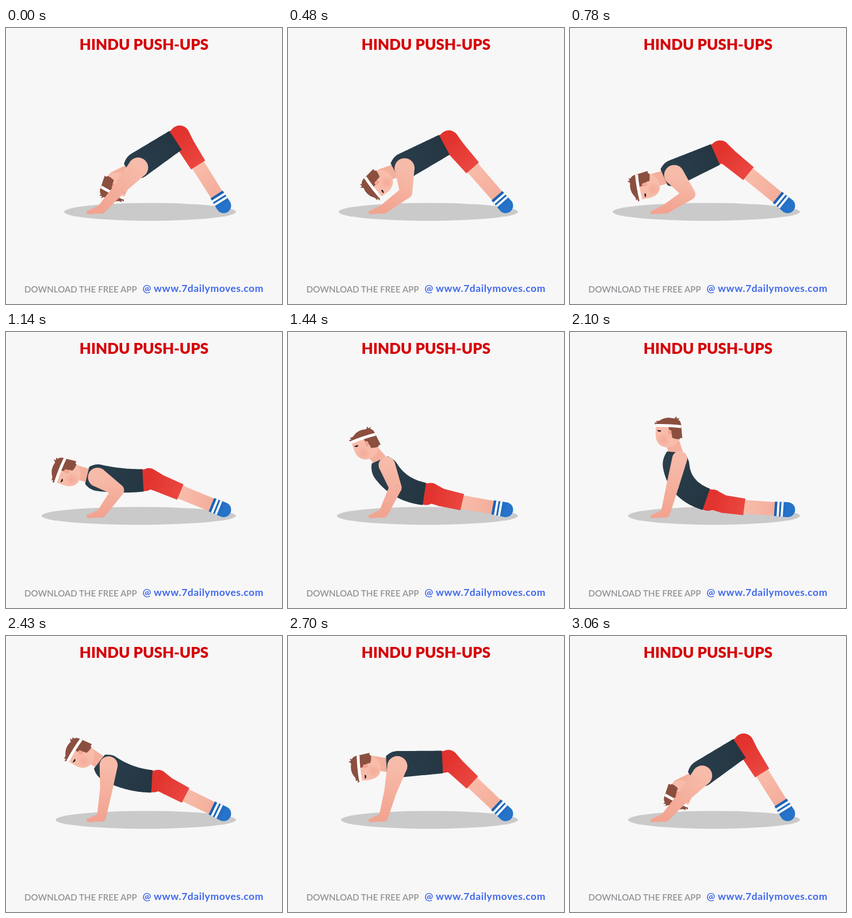
Recreate the animation shown at these times as an HTML page with a canvas. Size 480 by 480 pixels, loop 3120 ms.

```html
<!DOCTYPE html>
<html lang="en">
<head>
<meta charset="utf-8">
<title>Hindu push-ups</title>
<style>
  html, body { margin: 0; width: 100%; height: 100%; overflow: hidden; background: #f7f7f7; }
  canvas, svg { position: absolute; left: 0; top: 0; width: 480px; height: 480px; }
  text { font-family: Lato, "Open Sans", sans-serif; }
  .title { font-size: 26px; font-weight: 900; fill: #d60004; text-anchor: middle; }
  .note { font-size: 15.1px; font-weight: 600; fill: #929197; }
  .link { font-size: 17.6px; font-weight: 700; letter-spacing: .5px; fill: #4169ee; }
</style>
</head>
<body>
<canvas id="stage" width="480" height="480"></canvas>
<svg viewBox="0 0 480 480">
  <text class="title" x="240" y="37.5">HINDU PUSH-UPS</text>
  <text class="note" x="32" y="460">DOWNLOAD THE FREE APP</text>
  <text class="link" x="237.5" y="459">@</text>
  <text class="link" x="257" y="459">www.7dailymoves.com</text>
</svg>
<script>
const LOOP = 3120;
const ctx = document.getElementById('stage').getContext('2d');

const SPINE = 100, NECK = 35.5, UPPER_ARM = 42, FOREARM = 49;
const FOOT = [378.5, 309], WRIST = [166, 315], FINGERS = [143, 320.8];
const HAIR = '#8b4f40';

// waist x, y, spine angle, back bend, head angle, left end of the shadow
const PIKE = [297, 194, -33.5, 0, -156, 101];
const LOWER = [274, 202, -28, 0, -130, 88];
const DIVE = [255, 219, -24, 0, -102, 74];
const SKIM = [241, 254, 1, 6, -76, 61];
const RISE = [240, 282, 36.5, 28, -21, 85];
const COBRA = [240, 292, 56, 40, 0, 101];
const BACK = [258, 249, 17, 14, -66, 86];
const PLANK = [271, 219, -3, 0, -98, 92];

const KEYS = [
  [0, PIKE], [480, LOWER], [780, DIVE], [1100, SKIM], [1440, RISE], [1900, COBRA],
  [2100, COBRA], [2460, BACK], [2700, PLANK], [3060, PIKE], [LOOP, PIKE]
];

const rad = deg => deg * Math.PI / 180;
const polar = (deg, r) => [Math.cos(rad(deg)) * r, Math.sin(rad(deg)) * r];
const add = (a, b, k = 1) => [a[0] + b[0] * k, a[1] + b[1] * k];
const mix = (a, b, t) => [a[0] + (b[0] - a[0]) * t, a[1] + (b[1] - a[1]) * t];
const unit = (a, b) => {
  const d = Math.hypot(b[0] - a[0], b[1] - a[1]) || 1;
  return [(b[0] - a[0]) / d, (b[1] - a[1]) / d];
};
const side = v => [-v[1], v[0]];

function slope(k, i) {
  if (k === 0 || k === KEYS.length - 1) return 0;
  const rate = n => (KEYS[n + 1][1][i] - KEYS[n][1][i]) / (KEYS[n + 1][0] - KEYS[n][0]);
  const a = rate(k - 1), b = rate(k);
  return a * b <= 0 ? 0 : 2 * a * b / (a + b);
}

// Smooth interpolation without overshoot.
function poseAt(t) {
  let k = 0;
  while (k < KEYS.length - 2 && t >= KEYS[k + 1][0]) k++;
  const [t0, from] = KEYS[k], [t1, to] = KEYS[k + 1];
  const d = t1 - t0, u = (t - t0) / d, v = 1 - u;
  return from.map((a, i) =>
    a * v * v * (1 + 2 * u) + to[i] * u * u * (3 - 2 * u) +
    d * u * v * (v * slope(k, i) - u * slope(k + 1, i)));
}

function ramp(a, b, c0, c1) {
  const g = ctx.createLinearGradient(...a, ...b);
  g.addColorStop(0, c0);
  g.addColorStop(1, c1);
  return g;
}

function poly(points, fill) {
  ctx.beginPath();
  points.forEach(p => ctx.lineTo(...p));
  ctx.fillStyle = fill;
  ctx.fill();
}

function oval(x, y, rx, ry, fill) {
  ctx.beginPath();
  ctx.ellipse(x, y, rx, ry, 0, 0, 7);
  ctx.fillStyle = fill;
  ctx.fill();
}

// Tapered tube through joints [point, radius].
function limb(joints, fill, flatEnd) {
  const last = joints.length - 1;
  ctx.beginPath();
  joints.forEach(([p, r], i) => {
    if (!flatEnd || i < last) {
      ctx.moveTo(p[0] + r, p[1]);
      ctx.arc(...p, r, 0, 7);
      ctx.closePath();
    }
    if (i === last) return;
    const [q, s] = joints[i + 1];
    const n = side(unit(p, q));
    ctx.moveTo(...add(p, n, -r));
    ctx.lineTo(...add(q, n, -s));
    ctx.lineTo(...add(q, n, s));
    ctx.lineTo(...add(p, n, r));
    ctx.closePath();
  });
  ctx.fillStyle = fill;
  ctx.fill();
}

function drawLeg(waist, tangent, bend) {
  const hip = add(add(waist, tangent, 8), side(tangent), -3);
  const sag = [0, bend * 0.13];
  const thigh = add(mix(hip, FOOT, 0.14), sag);
  const hem = add(mix(hip, FOOT, 0.42), sag);
  const up = unit(FOOT, hem);
  const along = d => add(FOOT, up, d);
  limb([[hem, 12], [FOOT, 11.5]], ramp(hem, FOOT, '#f8bca9', '#f2a896'));
  limb([[FOOT, 13], [along(23), 12.5]], ramp(FOOT, along(23), '#2673ca', '#1a61b2'), true);
  ctx.strokeStyle = '#fff';
  ctx.lineWidth = 25.4;
  for (const d of [18.5, 11.5]) {
    ctx.beginPath();
    ctx.moveTo(...along(d));
    ctx.lineTo(...along(d - 3.8));
    ctx.stroke();
  }
  limb([[waist, 19], [hip, 17.5], [thigh, 15.5], [hem, 14.5]], ramp(hip, hem, '#e2332e', '#ea4740'), true);
}

function drawTorso(chest, ctrl, waist) {
  const front = [], back = [];
  for (let t = 0; t <= 1; t += 0.025) {
    const a = mix(chest, ctrl, t), b = mix(ctrl, waist, t);
    const edge = Math.max(0, 1 - t / 0.2);
    const width = (24 - 4.5 * t) * (1 - 0.36 * edge * edge);
    const p = mix(a, b, t), n = side(unit(a, b));
    front.push(add(p, n, width));
    back.unshift(add(p, n, -width));
  }
  poly([...front, ...back], ramp(chest, waist, '#2a3e4c', '#243642'));
}

function drawHead(head, angle, chest) {
  const turned = polar(angle + 70, 14);
  limb([[add(head, turned), 12], [chest, 12]], '#f4b09d');
  ctx.save();
  ctx.translate(...head);
  ctx.rotate(rad(angle));

  ctx.fillStyle = '#f8bcaa';
  ctx.fill(new Path2D('M-23-16L-23.5 4C-23 18-14 25-4 25C10 25 20 15 20 2V-16Z'));
  const blush = ctx.createRadialGradient(-10, 12, 1, -10, 12, 12);
  blush.addColorStop(0, 'rgba(238,138,122,.35)');
  blush.addColorStop(1, 'rgba(238,138,122,0)');
  oval(-10, 12, 12, 12, blush);

  ctx.fillStyle = HAIR;
  ctx.fill(new Path2D('M-1-12H21L23 9L19 9L18 11Q10 11 5 8Q6 0 0-3Z'));
  ctx.fill(new Path2D('M-23-14L-26-18L-21-18L-23-21Q-17-20-14-23Q-4-29 9-25L13-29L13-25L18-26L16-23Q21-20 21-12Z'));
  ctx.fillStyle = '#fff';
  ctx.fill(new Path2D('M-23-15.5Q0-16 21-13.5V-8.5Q0-11-23.5-10.5Z'));
  oval(1, -1, 3.2, 4.6, '#f2a693');
  ctx.fillStyle = '#241b1b';
  ctx.fill(new Path2D('M-21-5L-14-4.5V-3L-16-2L-19-2.5Z'));
  ctx.restore();
}

// The elbow follows from the two fixed bone lengths.
function drawArm(shoulder, bend) {
  const dir = unit(shoulder, WRIST);
  const d = Math.hypot(WRIST[0] - shoulder[0], WRIST[1] - shoulder[1]);
  const reach = d > UPPER_ARM + FOREARM ? d / 2 : (d * d + UPPER_ARM ** 2 - FOREARM ** 2) / (2 * d);
  const out = Math.sqrt(Math.max(0, UPPER_ARM ** 2 - reach ** 2));
  const elbow = add(add(shoulder, dir, reach), side(dir), -out);
  limb([[shoulder, 17.5 - bend * 0.11], [elbow, 10.8], [WRIST, 8], [FINGERS, 3]],
    ramp(shoulder, WRIST, '#f7bba9', '#f2a491'));
}

function draw(t) {
  const [wx, wy, spine, bend, nod, edge] = poseAt(t);
  const waist = [wx, wy];
  const chest = add(waist, polar(spine, -SPINE));
  const ctrl = add(mix(chest, waist, 0.5), polar(spine + 90, bend));
  const shoulder = add(add(chest, polar(spine, 17)), [2 - bend * 0.12, 3 - bend * 0.15]);
  const head = add(chest, polar(0.78 * spine + 0.3 * nod + 27, -NECK));

  ctx.clearRect(0, 0, 480, 480);
  oval((edge + 400) / 2, 319.7, (400 - edge) / 2, 15.5, '#cacaca');
  drawLeg(waist, unit(ctrl, waist), bend);
  drawHead(head, nod, chest);
  drawTorso(chest, ctrl, waist);
  drawArm(shoulder, bend);
}

// Five pictures per 180 ms; the first one stays twice as long.
function stepped(t) {
  const part = t % 180;
  return t - part + (part < 60 ? 0 : Math.floor(part / 30) * 30);
}

function tick() {
  draw(stepped(performance.now() % LOOP));
  requestAnimationFrame(tick);
}
tick();
</script>
</body>
</html>
```
